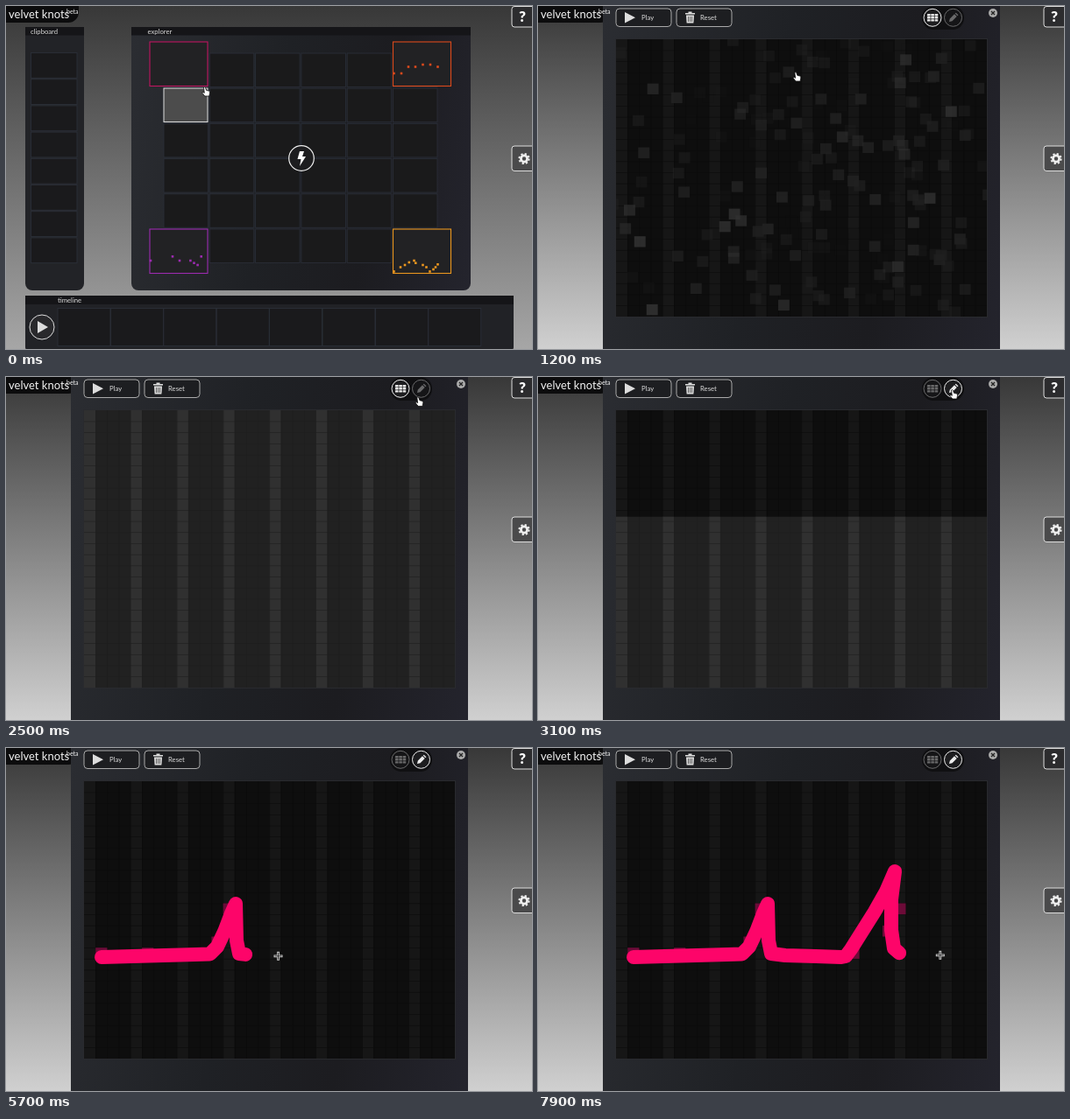
Recreate the animation shown at these times as an HTML page with a canvas. Size 600x392 px, loop 8000 ms.

```html
<!DOCTYPE html>
<html lang="en">
<head>
<meta charset="utf-8">
<title>Loop explorer</title>
<style>
html, body { margin: 0; width: 100%; height: 100%; overflow: hidden; background: #333; }
#stage { position: relative; width: 600px; height: 392px; overflow: hidden; font-family: Lato, "Open Sans", sans-serif; color: #eee; }
#stage > * { position: absolute; }
svg, canvas { left: 0; top: 0; width: 600px; height: 392px; overflow: hidden; }
svg text { font-size: 7.7px; fill: #ddd; }
.anim { animation: 8s linear infinite; transform-origin: 0 0; }

#sky { left: 0; top: 0; width: 100%; background: linear-gradient(#383838, #d0d0d0); animation-name: sky; }
#tab { left: 0; top: 0; width: 83px; height: 19px; background: #0c0c0d; border-radius: 0 0 12px 0; }
#panel { background: linear-gradient(100deg, #2b2d32, #1f2125 42%, #1c1c20 70%, #24242d); animation-name: panel; }
#sides { animation-name: sides; }
#grid { animation-name: grid; }
#pick { animation-name: pick; }
#bolt { animation-name: bolt; }
#paper { animation-name: paper; }
#buttons { animation-name: buttons; }
#tools { animation-name: tools; }
#gridTool { animation-name: gridTool; animation-timing-function: step-end; }
#penTool { animation-name: penTool; animation-timing-function: step-end; }

@keyframes sky { 0%, 1.25% { height: 540px } 10%, 11% { height: 480px } 15%, 100% { height: 392px } }
@keyframes panel {
  0%, 1.25% { left: 143px; top: 24px; width: 387px; height: 301px; border-radius: 0 0 8px 8px; animation-timing-function: ease-out }
  10%, 11% { left: 133px; top: 20px; width: 475px; height: 370px; border-radius: 0 0 9px 9px; animation-timing-function: ease-in-out }
  15%, 100% { left: 74px; top: -14px; width: 453px; height: 430px; border-radius: 0 }
}
@keyframes sides {
  0%, 1.25% { transform: none; animation-timing-function: ease-out }
  10%, 11% { transform: translate(-43.2px, -9.3px) scale(1.227); animation-timing-function: ease-in }
  15%, 100% { transform: translate(-170px, 20px) scale(1.3) }
}
@keyframes grid {
  0%, 1.25% { transform: none; opacity: 1; animation-timing-function: ease-out }
  10%, 11% { transform: translate(-43.2px, -9.3px) scale(1.227); opacity: 1; animation-timing-function: ease-in-out }
  15%, 100% { transform: translate(-112.7px, -12.4px) scale(1.23); opacity: 0 }
}
@keyframes pick { 0%, 1.25% { opacity: 1 } 4%, 100% { opacity: 0 } }
@keyframes bolt { 0%, 1.25% { opacity: 1 } 10%, 11% { opacity: .3 } 14%, 100% { opacity: 0 } }
@keyframes paper { 0%, 11.5% { opacity: 0 } 14.5%, 100% { opacity: 1 } }
@keyframes buttons {
  0%, 4% { transform: translate(-32px, 176px); opacity: 0 }
  10% { transform: translate(-17px, 94px); opacity: 1 }
  15%, 100% { transform: none; opacity: 1 }
}
@keyframes tools { 0%, 3% { opacity: 0 } 9%, 100% { opacity: 1 } }
@keyframes gridTool { 0% { opacity: 1 } 36.25%, 100% { opacity: .4 } }
@keyframes penTool { 0% { opacity: .4 } 36.25%, 100% { opacity: 1 } }

#name { left: 3px; top: 1px; font-size: 13px; line-height: 16px; white-space: nowrap; color: #f4f4f4; }
#name sup { position: absolute; left: 66px; top: 0; font-size: 7px; line-height: 10px; }
</style>
</head>
<body>
<div id="stage">
  <div id="sky" class="anim"></div>
  <div id="tab"></div>
  <svg><g id="sides" class="anim">
    <path d="M22 24h67v293a8 8 0 0 1-8 8H30a8 8 0 0 1-8-8z" fill="#222327"/>
    <rect x="22" y="24" width="67" height="9.5" fill="#151518"/>
    <text x="28" y="31.5">clipboard</text>
    <rect x="22" y="331" width="557" height="62" rx="3" fill="#212226"/>
    <rect x="22" y="331" width="557" height="10" fill="#151518"/>
    <text x="59" y="339">timeline</text>
    <g id="slots" fill="#1a1a1c" stroke="#2b2f38" stroke-width=".9"></g>
    <circle cx="41" cy="367" r="14" fill="#29292c" stroke="#ddd"/>
    <path d="M36 360l12 7-12 7z" fill="#ddd"/>
  </g></svg>
  <div id="panel" class="anim"></div>
  <svg><g id="grid" class="anim">
    <rect x="143" y="24" width="387" height="9.5" fill="#151518"/>
    <text x="161.5" y="31.5">explorer</text>
    <g id="cells" fill="#1a1a1b" stroke="#2a2e38" stroke-width=".9"></g>
    <rect id="pick" class="anim" x="180" y="94" width="50" height="38.5" fill="#4c4c4c" stroke="#ddd"/>
    <g id="corners"></g>
  </g></svg>
  <svg><g id="bolt" class="anim">
    <circle cx="337" cy="174" r="14.3" fill="#1d1d1f" stroke="#eee" stroke-width="1.2"/>
    <path d="M335 166h5l-2 6h4l-7 11 1.500-8h-4z" fill="#fff"/>
  </g></svg>
  <canvas id="paper" class="anim" width="600" height="392"></canvas>
  <svg>
    <g id="buttons" class="anim">
      <g fill="#1d1e21" stroke="#aaa">
        <rect x="89" y="3" width="63" height="20.500" rx="4"/>
        <rect x="158" y="3" width="63" height="20.500" rx="4"/>
      </g>
      <path d="M99 7l12 6.300-12 6.300z" fill="#ddd"/>
      <text x="118" y="15.800">Play</text>
      <path d="M168 8h3.500v-1.500h4V8h3.500v1.500h-11zM169 10.500h9l-.6 9h-7.800z" fill="#ddd"/>
      <path d="M171.500 12v6M173.500 12v6M175.500 12v6" stroke="#222" stroke-width=".7"/>
      <text x="185" y="15.800">Reset</text>
    </g>
    <g id="tools" class="anim">
      <rect x="438" y="0" width="48" height="27" rx="13" fill="#101012"/>
      <g id="gridTool" class="anim">
        <circle cx="450" cy="13.300" r="10" fill="#1d1d1f" stroke="#eee"/>
        <g id="nine" fill="#eee"></g>
      </g>
      <g id="penTool" class="anim">
        <circle cx="473.500" cy="13.300" r="10" fill="#1d1d1f" stroke="#eee"/>
        <path d="M469 18l.8-3.500 5.200-5.200 2.700 2.700-5.200 5.200zM475.700 8.600l1-.9 2.700 2.600-1 1z" fill="#eee"/>
      </g>
      <circle cx="519" cy="8" r="5" fill="#aaa"/>
      <path d="M517 6l4 4m0-4l-4 4" stroke="#222" stroke-width="1.300"/>
    </g>
    <g stroke="#ddd">
      <rect x="577" y="0.500" width="30" height="23.500" rx="3" fill="#2c2c2e"/>
      <rect x="577" y="160" width="30" height="28.500" rx="3" fill="#4a4a4b"/>
    </g>
    <text x="589" y="18" text-anchor="middle" style="font-size:17px;font-weight:900;fill:#fff">?</text>
    <g fill="none" stroke="#eee">
      <circle cx="591" cy="174.500" r="3.600" stroke-width="2.800"/>
      <circle cx="591" cy="174.500" r="5.600" stroke-width="2" stroke-dasharray="2.200 2.200"/>
    </g>
  </svg>
  <div id="name">velvet knots<sup>beta</sup></div>
  <svg>
    <path id="hand" d="M-2.500-5q1.200-1 2 .3l1 3 3 .8q1.300.5 1 2L3.800 5h-5L-4 1.500q-.6-1.500 1-1l1.300.8z" fill="#fff" stroke="#111" stroke-width=".8"/>
    <g id="cross" fill="none">
      <path d="M-5 0H5M0-5V5" stroke="#ccc" stroke-width="2.800"/>
      <path d="M-4 0H4M0-4V4" stroke="#333" stroke-width="1"/>
    </g>
  </svg>
</div>
<script>
const $ = id => document.getElementById(id);
const clamp = v => Math.max(0, Math.min(1, v));

function rect(parent, x, y, width, height, more = {}) {
  const el = document.createElementNS('http://www.w3.org/2000/svg', 'rect');
  for (const [k, v] of Object.entries({ x, y, width, height, ...more })) el.setAttribute(k, v);
  parent.append(el);
}

for (let i = 0; i < 8; i++) {
  rect($('slots'), 28.5, 53.5 + i * 30.2, 52.5, 28.8);
  rect($('slots'), 59 + i * 60.4, 345.5, 60, 43);
}
for (let i = 0; i < 36; i++)
  rect($('cells'), 180 + i % 6 * 52.3, 54 + (i / 6 | 0) * 40.2, 50.5, 38.5);
for (let i = 0; i < 9; i++)
  rect($('nine'), 444 + i % 3 * 4.3, 9 + (i / 3 | 0) * 3.1, 3.6, 2.4, { rx: .5 });

// Each corner: place, colour, then dots as x,y pairs inside it
const corners = [
  [164, 41, '#c01560', []],
  [441.5, 41, '#dc4a1c', [1, 36, 9.5, 36, 17.5, 28.5, 25.5, 28.5, 34, 26, 42.5, 26, 51, 28.5]],
  [164, 255, '#9c2bb0', [1, 36, 26, 31.3, 34, 36, 46.4, 36, 50.5, 38.7, 54.6, 41, 58.7, 31.3]],
  [441.5, 255, '#ea961f', [1, 48.4, 8.5, 43.5, 13.5, 41, 18.3, 38, 24, 36, 25.8, 38.7, 34, 41, 38, 43.5, 42, 48.4, 46, 46, 48.5, 43.5, 51, 40.3]]
];
for (const [x, y, color, dots] of corners) {
  rect($('corners'), x, y, 66, 50.5, { fill: '#222224', stroke: color, 'stroke-width': 1.1 });
  for (let i = 0; i < dots.length; i += 2)
    rect($('corners'), x + dots[i] - 1.3, y + dots[i + 1] - 1.3, 2.6, 2.6, { fill: color });
}

// Pointer routes as [ms, x, y]
const handPath = [[0, 228, 98], [100, 228, 98], [800, 211, 84], [1000, 214, 84], [1550, 458, 75],
  [1900, 458, 70], [2600, 474, 20], [3200, 474, 20], [3700, 109, 239]];
const penPath = [[3800, 109, 239], [4410, 216, 236], [4500, 232, 235.5], [4700, 233, 235], [4900, 241, 227],
  [5100, 249, 210], [5300, 257, 189], [5500, 262, 178], [5560, 263, 220], [5580, 266, 235], [5610, 282, 237],
  [5700, 317, 238], [6200, 346, 239], [6300, 351, 238], [6420, 357, 230], [6800, 384, 187], [7000, 397, 164],
  [7300, 407, 141], [7450, 403, 173], [7620, 403, 208], [7740, 406, 229], [7810, 414, 236], [7900, 469, 237]];

function along(path, t) {
  let i = path.findIndex(p => p[0] > t);
  if (i < 0) return path[path.length - 1].slice(1);
  if (i === 0) return path[0].slice(1);
  const [t0, x0, y0] = path[i - 1], [t1, x1, y1] = path[i], k = (t - t0) / (t1 - t0);
  return [x0 + (x1 - x0) * k, y0 + (y1 - y0) * k];
}

// Note sheet: 32 steps by 25 pitches
const X = 89, Y = 38, W = 423, H = 317, COLS = 32, ROWS = 25, cw = W / COLS, rh = H / ROWS;
const notes = [[1, 15], [5, 15], [11, 14], [12, 11], [20, 15], [23, 13], [24, 11]];
const LAG = 90;
const g = $('paper').getContext('2d');

let seed = 11;
const rand = () => (seed = seed * 16807 % 2147483647) / 2147483647;
const tiles = [];
for (let c = 0; c < COLS; c++)
  for (let r = 0; r < ROWS; r++)
    tiles.push({ c, r, dx: rand() * 180 - 90, dy: rand() * 180 - 90, wait: rand() });
tiles.sort((a, b) => (a.c % 4 === 0) - (b.c % 4 === 0));

function box(color, x, y, w, h) {
  g.fillStyle = color;
  g.fillRect(x, y, w, h);
}

function drawSheet(base, bar, line) {
  box(base, X, Y, W, H);
  for (let c = 0; c < COLS; c += 4) box(bar, X + c * cw, Y, cw, H);
  for (let c = 1; c < COLS; c++) box(line, X + c * cw, Y, .6, H);
  for (let r = 1; r < ROWS; r++) box(line, X, Y + r * rh, W, .6);
}

function drawTiles(t) {
  for (const { c, r, dx, dy, wait } of tiles) {
    const p = clamp((t - 1100 - wait * 350) / 350);
    if (!p) continue;
    const off = (1 - p) ** 3;
    g.globalAlpha = Math.min(1, p * 4);
    box(c % 4 ? '#212121' : '#313131', X + c * cw + dx * off, Y + r * rh + dy * off, cw - .3, rh - .3);
  }
  g.globalAlpha = 1;
}

function drawStroke(end) {
  const tipX = along(penPath, end)[0];
  for (const [c, r] of notes)
    if (tipX > X + c * cw) box('#6c0b38', X + c * cw, Y + r * rh, cw, rh);
  g.beginPath();
  g.moveTo(109, 239);
  for (const [t, x, y] of penPath) if (t < end) g.lineTo(x, y);
  g.lineTo(...along(penPath, end));
  g.strokeStyle = '#fd0569';
  g.lineWidth = 16;
  g.lineCap = g.lineJoin = 'round';
  g.stroke();
}

function drawPaper(t) {
  g.clearRect(0, 0, 600, 392);
  g.save();
  g.beginPath();
  g.rect(X, Y, W, H);
  g.clip();
  drawSheet('#0e0e0e', '#161616', '#0b0b0b');
  if (t < 1800) drawTiles(t);
  else {
    const wipe = clamp((t - 2900) / 477) * H;
    if (wipe < H) {
      g.beginPath();
      g.rect(X, Y + wipe, W, H - wipe);
      g.clip();
      drawSheet('#212121', '#303030', '#1e1e1e');
    }
  }
  if (t > 3800) drawStroke(Math.max(3800, t - LAG));
  g.restore();
  g.strokeStyle = '#292a2e';
  g.lineWidth = 1;
  g.strokeRect(X - .5, Y - .5, W + 1, H + 1);
}

function place(el, [x, y], shown) {
  el.setAttribute('transform', `translate(${x} ${y})`);
  el.style.display = shown ? '' : 'none';
}

// Share the clock of the CSS animations
const clock = $('sky').getAnimations()[0];
function frame() {
  const t = (clock.currentTime || 0) % 8000;
  drawPaper(t);
  place($('hand'), along(handPath, t), t < 3260);
  place($('cross'), t < 3800 ? along(handPath, t) : along(penPath, t), t >= 3260);
  requestAnimationFrame(frame);
}
frame();
</script>
</body>
</html>
```
